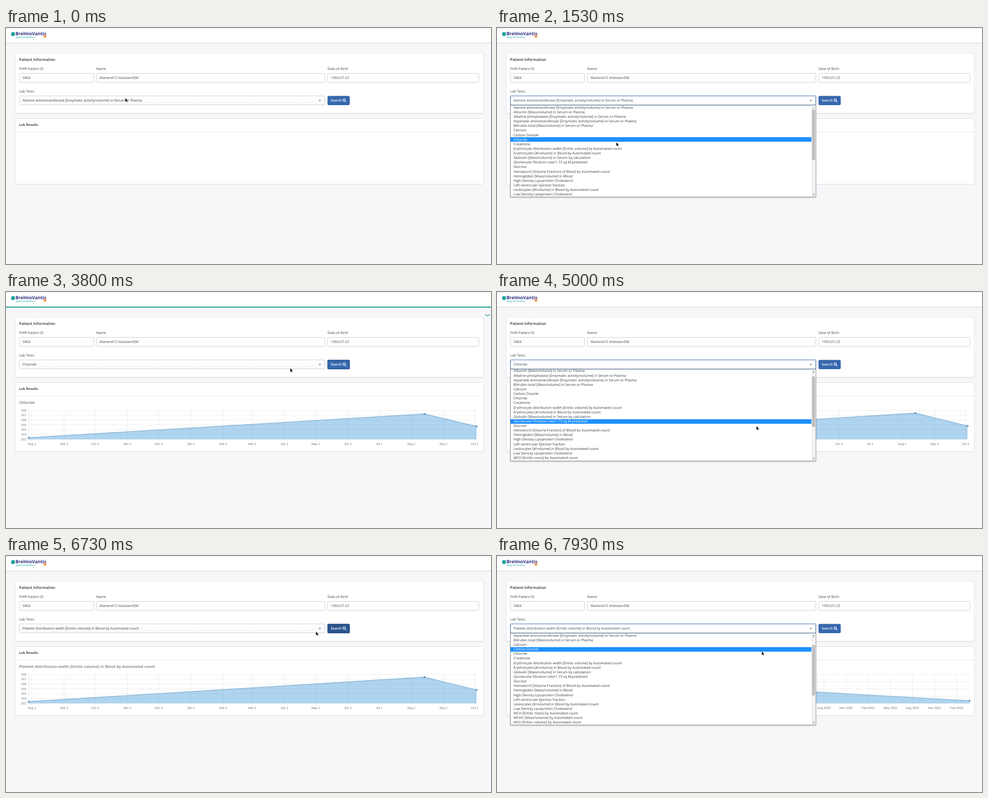
Animation of 1071x523 px, one loop 8 s. Source, as an HTML page:

```html
<!DOCTYPE html>
<html lang="en">
<head>
<meta charset="utf-8">
<title>Lab results</title>
<style>
html, body { margin: 0; width: 100%; height: 100%; overflow: hidden; background: #f5f7f8; }
svg { display: block; width: 1071px; height: 523px; }
text { font: 7.7px "Open Sans", "Noto Sans", sans-serif; fill: #3c434a; text-rendering: geometricPrecision; white-space: pre; }
.head { font-weight: 600; fill: #272c32; }
.axis text { font: 6.9px "Liberation Sans", Arial, sans-serif; fill: #737373; }
.card { fill: #fff; stroke: #e3e6e9; }
.field { fill: #fff; stroke: #c6ccd2; }
.shade { fill: #000; opacity: .05; }
#title { font-size: 8.3px; font-weight: 700; fill: #878e96; }
#rows text { fill: #333a42; }
#rows .on { fill: #fff; }
</style>
</head>
<body>
<svg viewBox="0 0 1071 523" xmlns="http://www.w3.org/2000/svg">
  <defs>
    <linearGradient id="soft" x2="0" y2="1"><stop stop-color="#fff"/><stop offset="1" stop-color="#f5f7f9"/></linearGradient>
    <clipPath id="listClip"><rect x="30" y="171.5" width="673.5" height="202.5"/></clipPath>
    <filter id="blur" x="-1" y="-2" width="3" height="5"><feGaussianBlur stdDeviation="1.6"/></filter>
  </defs>
  <rect width="1071" height="523" fill="#f5f7f8"/>
  <rect y="33" width="1071" height="2" fill="#000" opacity=".035"/>
  <rect width="1071" height="33" fill="#fff"/>
  <rect width="1071" height="1" fill="#e8eaec"/>
  <rect y="32.6" width="1071" height="1" fill="#dadee2"/>
  <rect x="11.5" y="9.5" width="8" height="8" fill="#1fa39a"/>
  <text x="21" y="16" style="font-size:10.1px;font-weight:700;fill:#2c2f83">BrelmoVantis</text>
  <text x="21.5" y="21.7" style="font-size:4.4px;font-weight:600;fill:#17a298">QELA Care Platform</text>
  <circle cx="86" cy="18.5" r="3.2" fill="#f3a05a"/>

  <rect class="shade" x="19.5" y="56" width="1035.5" height="134.5" rx="2.5"/>
  <rect class="card" x="20.5" y="55.5" width="1033.5" height="133" rx="2"/>
  <text class="head" x="29" y="72.8" style="font-size:8.4px">Patient Information</text>
  <text x="29" y="92.5">FHIR Patient ID</text>
  <text x="199.3" y="92.5">Name</text>
  <text x="710" y="92.5">Date of Birth</text>
  <text x="29" y="142.7">Lab Tests</text>
  <rect class="field" x="29.5" y="100.5" width="164" height="20" rx="2"/>
  <rect class="field" x="199.5" y="100.5" width="504.5" height="20" rx="2"/>
  <rect class="field" x="710.5" y="100.5" width="334" height="20" rx="2"/>
  <text x="36.5" y="113.3">5804</text>
  <text x="206.7" y="113.3">Marlen415 Hobstein906</text>
  <text x="717.5" y="113.3">1950-07-23</text>
  <rect id="select" x="29.5" y="150.5" width="674.5" height="20" rx="2"/>
  <text id="choice" x="36.5" y="163.3"></text>
  <path d="M690.3 159.6h5.4l-2.7 2.9z" fill="#777d84"/>
  <rect id="button" x="710.5" y="151" width="48" height="19.5" rx="2"/>
  <text x="717" y="163.4" style="font-size:7.5px;font-weight:600;fill:#fff">Search</text>
  <g fill="none" stroke="#fff" stroke-width="1.3"><circle cx="746.7" cy="159.7" r="2.6"/><path d="M748.6 161.6l2.5 2.5"/></g>

  <rect id="shade2" class="shade" x="19.5" y="201" width="1035.5" rx="2.5"/>
  <rect id="card2" class="card" x="20.5" y="200.5" width="1033.5" rx="2"/>
  <text class="head" x="29" y="217.4" style="font-size:7.6px">Lab Results</text>
  <rect x="21" y="230" width="1033" height="1" fill="#e6e9ec"/>
  <text id="title" x="29" y="247.8"></text>
  <g id="charts"></g>

  <g id="list">
    <rect x="29" y="173" width="676" height="204" fill="#000" opacity=".13" filter="url(#blur)"/>
    <rect x="29.5" y="171" width="674.5" height="203.5" fill="#fff" stroke="#767b82"/>
    <g clip-path="url(#listClip)">
      <rect id="mark" x="30" width="664.5" height="10" fill="#1e90ff"/>
      <g id="rows"></g>
      <rect x="694.5" y="171" width="9.5" height="204" fill="#f2f2f2"/>
      <rect id="thumb" x="695.5" width="7" height="111.5" fill="#c0c0c0"/>
      <path id="up" d="M697 178h4l-2-2.4z"/>
      <path d="M697 368h4l-2 2.4z" fill="#505050"/>
    </g>
  </g>

  <g id="loader" fill="#14a085">
    <rect id="glow" y="31.5" width="10" height="4.5" filter="url(#blur)"/>
    <rect id="bar" y="32.5" height="2.2"/>
    <path id="spin" d="M1058.6 45.5A5.2 5.2 0 0 1 1068.4 45.5" fill="none" stroke="#14a085" stroke-width="1.3"/>
  </g>
  <path id="cursor" d="M0 0V8.7L2 7 3.4 10 4.9 9.3 3.6 6.5H6.3Z" stroke="#fff" stroke-width=".5"/>
</svg>
<script>
const $ = id => document.getElementById(id);
const set = (el, attrs) => { for (const k in attrs) el.setAttribute(k, attrs[k]); };
const show = (el, on) => { el.style.display = on ? '' : 'none'; };
const clamp = v => Math.max(0, Math.min(1, v));
const smooth = p => p * p * (3 - 2 * p);

// Eased moves, each { from, to } in time and the place it ends at.
const glide = (home, moves, t) => moves.reduce((at, { from, to, end }) => {
  const p = smooth(clamp((t - from) / (to - from)));
  return at.map((v, i) => v + (end[i] - v) * p);
}, home);

const LOOP = 8000, ROW = 10.135, TOP = 171.3;

// Clicks that open the list, choose a test and start a search.
const opens = [800, 4330, 7520], picks = [1870, 5530], searches = [2900, 6600];
const choices = [0, 7, 23];
const REPLY = 322;
const last = (times, t) => Math.max(-1, ...times.filter(v => v <= t));

const moves = [
  { from: 40, to: 90, end: [263.3, 150] },
  { from: 500, to: 560, end: [261.5, 167] },
  { from: 800, to: 1400, end: [263.3, 253] },
  { from: 1870, to: 2700, end: [732, 161] },
  { from: 3050, to: 3280, end: [629.7, 169] },
  { from: 3700, to: 4300, end: [600, 163] },
  { from: 4330, to: 5000, end: [572.8, 297] },
  { from: 5730, to: 6450, end: [733, 162] },
  { from: 6600, to: 6730, end: [684.3, 167.3] },
  { from: 6760, to: 7450, end: [590, 163] },
  { from: 7500, to: 7930, end: [584.5, 211] }
];
const scrolls = [{ from: 4904, to: 5400, end: [114] }, { from: 5600, to: 6000, end: [30.3] }];
const pointer = t => glide([263.3, 155], moves, t);
const scroll = t => glide([0], scrolls, t)[0];

const auto = 'by Automated count', sp = 'in Serum or Plasma';
const tests = [
  'Alanine aminotransferase [Enzymatic activity/volume] ' + sp,
  'Albumin [Mass/volume] ' + sp,
  'Alkaline phosphatase [Enzymatic activity/volume] ' + sp,
  'Aspartate aminotransferase [Enzymatic activity/volume] ' + sp,
  'Bilirubin.total [Mass/volume] ' + sp,
  'Calcium', 'Carbon Dioxide', 'Chloride', 'Creatinine',
  'Erythrocyte distribution width [Entitic volume] ' + auto,
  'Erythrocytes [#/volume] in Blood ' + auto,
  'Globulin [Mass/volume] in Serum by calculation',
  'Glomerular filtration rate/1.73 sq M.predicted',
  'Glucose',
  'Hematocrit [Volume Fraction] of Blood ' + auto,
  'Hemoglobin [Mass/volume] in Blood',
  'High Density Lipoprotein Cholesterol',
  'Left ventricular Ejection fraction',
  'Leukocytes [#/volume] in Blood ' + auto,
  'Low Density Lipoprotein Cholesterol',
  'MCH [Entitic mass] ' + auto,
  'MCHC [Mass/volume] ' + auto,
  'MCV [Entitic volume] ' + auto,
  'Platelet distribution width [Entitic volume] in Blood ' + auto,
  'Platelet mean volume [Entitic volume] in Blood ' + auto,
  'Platelets [#/volume] in Blood ' + auto,
  'Potassium',
  'Protein [Mass/volume] ' + sp,
  'Sodium', 'Total Cholesterol', 'Triglycerides', 'Urea Nitrogen',
  'Microalbumin Creatinine Ratio'
];
$('rows').innerHTML = tests.map((s, i) => `<text x="36.5" y="${TOP + 7.4 + i * ROW}">${s}</text>`).join('');
const rowTexts = [...$('rows').children];

const BASE = 326.5, HEIGHT = 64;

function makeChart(right, xTicks, yLabels, points) {
  const g = document.createElementNS('http://www.w3.org/2000/svg', 'g');
  let grid = `M50 ${BASE - HEIGHT}V331.5`, labels = '';
  yLabels.forEach((s, i) => {
    const y = BASE - HEIGHT * i / (yLabels.length - 1);
    grid += `M45 ${y}H${right}`;
    labels += `<text x="44.5" y="${y + 2.2}" text-anchor="end">${s}</text>`;
  });
  xTicks.forEach(([x, s]) => {
    grid += `M${x} ${BASE - HEIGHT}V331.5`;
    labels += `<text x="${x}" y="338.5" text-anchor="middle">${s}</text>`;
  });
  g.innerHTML = `<path d="${grid}" stroke="#000" stroke-opacity=".1" stroke-width=".8" fill="none"/>
    <g class="axis">${labels}</g><path class="area" fill="#3993d7" fill-opacity=".4"/>
    <path class="line" fill="none" stroke="#93bddd" stroke-width="1.9"/>` +
    points.map(p => `<circle cx="${p[0]}" r="1.9" fill="#6d9fc9" stroke="#4f86b5" stroke-width=".6"/>`).join('');
  $('charts').append(g);
  const area = g.querySelector('.area'), line = g.querySelector('.line'), dots = g.querySelectorAll('circle');
  return (visible, age) => {
    show(g, visible);
    if (!visible) return;
    const grow = 1 - (1 - clamp(age / 1000)) ** 4;
    const pts = points.map(([x, y]) => [x, BASE + (y - BASE) * grow]);
    const d = 'M' + pts.map(p => p.join(' ')).join('L');
    set(line, { d });
    set(area, { d: `${d}V${BASE}H${pts[0][0]}Z` });
    dots.forEach((dot, i) => set(dot, { cy: pts[i][1] }));
  };
}

const range = (n, fn) => Array.from({ length: n }, (_, i) => fn(i));
const monthName = date => date.toLocaleString('en-US', { month: 'short', timeZone: 'UTC' });
const monthly = range(15, i => {
  const first = Date.UTC(2018, 7), date = new Date(Date.UTC(2018, 7 + i));
  return [57 + (date - first) / 864e5 * 2.296, monthName(date) + ' 1'];
});
const quarterly = range(20, i => {
  const date = new Date(Date.UTC(1997, 4 + 3 * i));
  return [86.3 + i * 48.9, `${monthName(date)} ${date.getUTCFullYear()}`];
});
const chloride = makeChart(1039, monthly, range(7, i => 102 + i), [[50, 322.8], [924, 268.5], [1039, 296.8]]);
const platelet = makeChart(1044, quarterly, range(5, i => 300 + 20 * i), [[50, 263.8], [1043.5, 320.8]]);

function drawLoader(age) {
  const shown = age >= 0 && age < 1050;
  show($('loader'), shown);
  if (!shown) return;
  const width = 1071 * clamp(age / 450) ** 1.633;
  set($('bar'), { width });
  set($('glow'), { x: width - 9, opacity: width < 1071 ? .7 : 0 });
  set($('spin'), { transform: `rotate(${(age - 140) / 353 * 360} 1063.5 47.3)` });
  set($('loader'), { opacity: 1 - clamp((age - 800) / 250) });
}

function drawList(t, selected) {
  const s = scroll(t);
  // The highlight trails the pointer slightly.
  const y = pointer(t - 50)[1] - 2 - TOP;
  const row = y > 0 ? Math.floor((y + scroll(t - 50)) / ROW) : selected;
  set($('rows'), { transform: `translate(0 ${-s})` });
  set($('mark'), { y: Math.round(TOP + row * ROW - s) });
  rowTexts.forEach((el, i) => el.classList.toggle('on', i === row));
  set($('thumb'), { y: 181 + s * .55 });
  set($('up'), { fill: s > 0 ? '#505050' : '#a8a8a8' });
}

function draw(t) {
  const opened = last(opens, t), picked = last(picks, t), searched = last(searches, t);
  const selected = choices[picks.filter(v => v <= t).length];
  $('choice').textContent = tests[selected];
  $('title').textContent = selected ? tests[selected] : '';

  const bottom = selected ? 353 : 346;
  set($('card2'), { height: bottom - 200.5 });
  set($('shade2'), { height: bottom - 199.5 });

  const active = opened > searched;
  set($('select'), {
    fill: active ? '#fff' : 'url(#soft)', stroke: active ? '#2f5f9f' : '#c6ccd2', 'stroke-width': active ? 1.2 : 1
  });
  const [hx, hy] = pointer(t - 100);
  const fill = hx > 710 && hx < 759 && hy > 150 && hy < 171 ? '#2c558e' : '#3668ae';
  const focused = searched > opened;
  set($('button'), { fill, stroke: focused ? '#204a85' : fill, 'stroke-width': focused ? 1.6 : 1 });

  const [first, second] = searches.map(v => t - v - REPLY);
  chloride(first >= 0 && second < 0, first);
  platelet(second >= 0, second);

  const open = opened > picked;
  show($('list'), open);
  if (open) drawList(t, selected);
  drawLoader(searched < 0 ? -1 : t - searched - 230);
  set($('cursor'), { transform: `translate(${pointer(t).join(' ')})` });
}

const start = performance.now();
function tick() {
  draw((performance.now() - start) % LOOP);
  requestAnimationFrame(tick);
}
tick();
</script>
</body>
</html>
```
